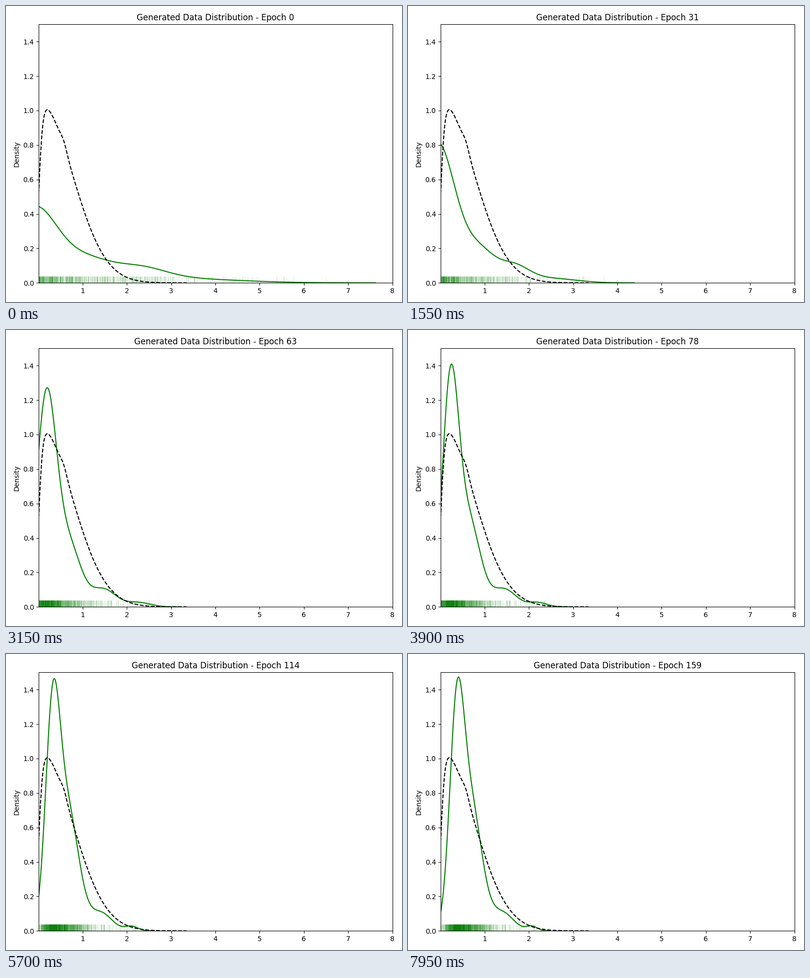
Recreate the animation shown at these times as a matplotlib script. Size 800x600 px, loop 8 s.

```python
import numpy as np
import matplotlib.pyplot as plt
from matplotlib.animation import FuncAnimation
from matplotlib.collections import LineCollection

FRAMES, INTERVAL = 160, 50
SAMPLES = 1000


def bell(x, center, width, height):
    return height * np.exp(-0.5 * ((x - center) / width) ** 2)


def sigmoid(x):
    return 1 / (1 + np.exp(-x))


def track(t, values):
    """Smooth path through values at the key epochs."""
    v = np.array(values)
    slope = np.gradient(v, KEYS)
    i = np.clip(np.searchsorted(KEYS, t) - 1, 0, len(KEYS) - 2)
    h = KEYS[i + 1] - KEYS[i]
    s = (t - KEYS[i]) / h
    return ((1 + 2 * s) * (1 - s) ** 2 * v[i] + s * (1 - s) ** 2 * h * slope[i]
            + s * s * (3 - 2 * s) * v[i + 1] + s * s * (s - 1) * h * slope[i + 1])


KEYS = np.array([0, 18, 45, 63, 93, 135, 159], float)
CORE_CENTER = [-0.1, -0.18, 0.075, 0.18, 0.258, 0.367, 0.367]
CORE_HEIGHT = [0.43, 0.64, 1.01, 1.2, 1.23, 1.06, 1.1]
SHOULDER_CENTER = [1.05, 0.95, 0.84, 0.68, 0.63, 0.688, 0.68]


def components(t):
    """Center, width and height of core, shoulder, slope and tail."""
    fade = np.exp(-t / 25)
    return [
        (track(t, CORE_CENTER), 0.16 + 0.38 * sigmoid((42 - t) / 13),
         track(t, CORE_HEIGHT)),
        (track(t, SHOULDER_CENTER), 0.25 + 0.3 * fade,
         0.11 + 0.63 * sigmoid((t - 70) / 16)),
        (1.4 + 0.85 * fade, 0.25 + 0.35 * fade, 0.105 - 0.035 * fade),
        (2.05 + 0.95 * np.exp(-t / 40), 0.12 + 1.28 * np.exp(-t / 30), 0.026),
    ]


def real_density(x):
    """Half-normal with a softened edge at zero."""
    body = bell(x, 0, 0.756, 1.06) + bell(x, 0.575, 0.07, 0.03)
    return body * sigmoid((x - 0.008) / 0.048)


grid = np.linspace(-2.5, 8, 3000)
noise = np.random.default_rng(4).random(SAMPLES)

fig, ax = plt.subplots(figsize=(8, 6), dpi=100)
rug = LineCollection([], colors="g", linewidths=1, alpha=0.1,
                     transform=ax.get_xaxis_transform())
ax.add_collection(rug, autolim=False)
curve, = ax.plot([], [], color="g", lw=1.5)
real_x = np.linspace(0, 3.35, 400)
ax.plot(real_x, real_density(real_x), color="black", ls="--", lw=1.5)
ax.set_xlim(0.01, 8)
ax.set_ylim(0, 1.5)
ax.set_ylabel("Density")
title = ax.set_title("Generated Data Distribution - Epoch 0")
fig.tight_layout()


def update(epoch):
    parts = components(epoch)
    density = sum(bell(grid, *p) for p in parts)
    center, width, _ = parts[-1]
    shown = grid < center + 3.3 * width
    curve.set_data(grid[shown], density[shown])

    # Fixed noise pushed through the inverse upper-tail distribution
    tail = np.cumsum(density[::-1])
    ticks = np.interp(noise, tail / tail[-1], grid[::-1])
    rug.set_segments([[(x, 0), (x, 0.025)] for x in ticks if x > 0])
    title.set_text(f"Generated Data Distribution - Epoch {epoch}")
    return curve, rug, title


anim = FuncAnimation(fig, update, frames=FRAMES, interval=INTERVAL,
                     repeat=True, repeat_delay=0)
plt.show()
```
